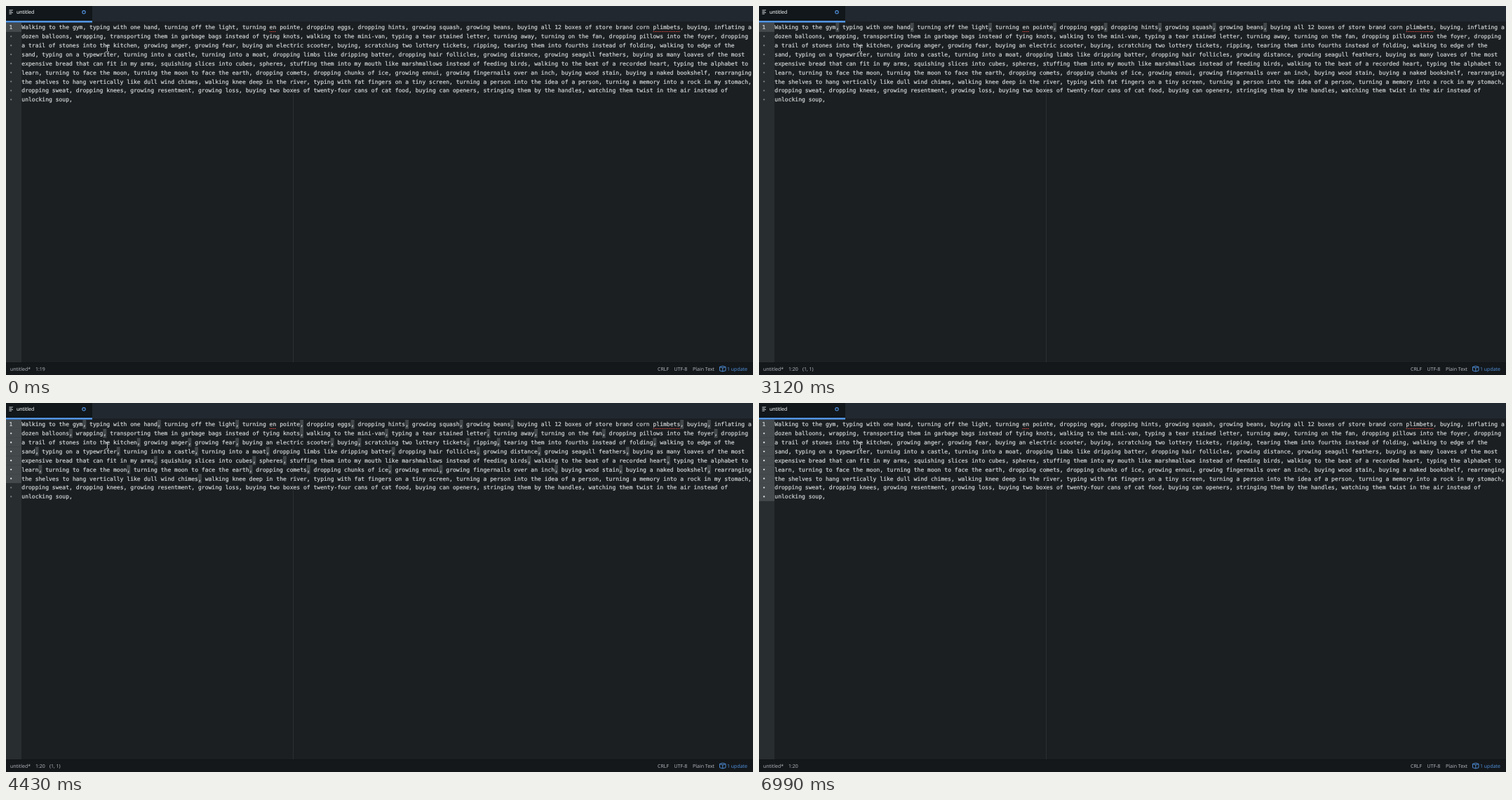
An HTML page that plays this animation: 1065 px wide and 526 px high, repeating every 8 s.

```html
<!DOCTYPE html>
<html lang="en">
<head>
<meta charset="utf-8">
<title>Text editor, many cursors</title>
<style>
  html, body { margin: 0; width: 100%; height: 100%; overflow: hidden; background: #1b1f21; }
  svg { display: block; width: 100%; height: 100%; }
  text { text-rendering: geometricPrecision; }
  .code { font: 8.04px "DejaVu Sans Mono", monospace; fill: #d3d6d7; stroke: #d3d6d7; stroke-width: .2px; }
  .ui { font: 7px "Open Sans", "Noto Sans", sans-serif; fill: #b9bec4; }
  .blue { fill: #5294e2; }
</style>
</head>
<body>
<svg id="stage" viewBox="0 0 1065 526" preserveAspectRatio="none"></svg>
<script>
const LOOP = 8000;
const GUTTER = 22, LEFT = 22.3, TOP = 24, CHAR = 4.84, ROW = 12.87;

const lines = [
  "Walking to the gym, typing with one hand, turning off the light, turning en pointe, dropping eggs, dropping hints, growing squash, growing beans, buying all 12 boxes of store brand corn plimbets, buying, inflating a",
  "dozen balloons, wrapping, transporting them in garbage bags instead of tying knots, walking to the mini-van, typing a tear stained letter, turning away, turning on the fan, dropping pillows into the foyer, dropping",
  "a trail of stones into the kitchen, growing anger, growing fear, buying an electric scooter, buying, scratching two lottery tickets, ripping, tearing them into fourths instead of folding, walking to edge of the",
  "sand, typing on a typewriter, turning into a castle, turning into a moat, dropping limbs like dripping batter, dropping hair follicles, growing distance, growing seagull feathers, buying as many loaves of the most",
  "expensive bread that can fit in my arms, squishing slices into cubes, spheres, stuffing them into my mouth like marshmallows instead of feeding birds, walking to the beat of a recorded heart, typing the alphabet to",
  "learn, turning to face the moon, turning the moon to face the earth, dropping comets, dropping chunks of ice, growing ennui, growing fingernails over an inch, buying wood stain, buying a naked bookshelf, rearranging",
  "the shelves to hang vertically like dull wind chimes, walking knee deep in the river, typing with fat fingers on a tiny screen, turning a person into the idea of a person, turning a memory into a rock in my stomach,",
  "dropping sweat, dropping knees, growing resentment, growing loss, buying two boxes of twenty-four cans of cat food, buying can openers, stringing them by the handles, watching them twist in the air instead of",
  "unlocking soup,"
];

// [time, number of selected commas]
const picks = [
  [1510, 1], [2510, 2], [2970, 3], [3120, 8], [3240, 12], [3390, 16],
  [3510, 20], [3630, 24], [3750, 28], [3880, 32], [4000, 36], [4150, 40],
  [4300, 45], [4430, 49], [4570, 53], [4700, 57], [4860, 61]
];
const RELEASE = 6290;

const SVG = "http://www.w3.org/2000/svg";
const stage = document.getElementById("stage");
const colX = c => LEFT + c * CHAR;
const rowY = r => TOP + r * ROW;

function add(tag, attrs, text, parent = stage) {
  const el = document.createElementNS(SVG, tag);
  for (const k in attrs) el.setAttribute(k, attrs[k]);
  if (text) el.textContent = text;
  return parent.appendChild(el);
}
const rect = (x, y, width, height, fill) => add("rect", { x, y, width, height, fill });
const path = (d, stroke, width = 1) =>
  add("path", { d, stroke, "stroke-width": width, fill: "none" });
const label = (x, y, text, cls = "ui") => add("text", { x, y, class: cls }, text);
const show = (el, on) => el.setAttribute("visibility", on ? "visible" : "hidden");

// Each word starts on its column of the character grid
function codeLine(line, r) {
  const row = add("text", { y: rowY(r) + 9.3, class: "code" });
  for (const m of line.matchAll(/\S+/g)) add("tspan", { x: colX(m.index) }, m[0], row);
}

// Editor background, gutter and wrap guide
rect(0, 0, 1065, 526, "#1b1f21");
rect(0, TOP, GUTTER, 484, "#282d2f");
rect(409, TOP, 1, 484, "#2a2f31");

// Tab bar
rect(0, 0, 1065, 22, "#21282f");
rect(0, 22, 1065, 2, "#1a1f23");
rect(0, 0, 123, 21, "#11171a");
rect(0, 21, 123, 2.6, "#5294e2");
path("M4.5 5.9H10M4.5 7.7H8.5M4.5 9.5H10M4.5 11.3H8", "#c5cad0", .9);
label(15, 11.4, "untitled").setAttribute("style", "fill:#eef0f2;stroke:#eef0f2;stroke-width:.12px");
add("circle", { cx: 111, cy: 8.8, r: 2.2, fill: "none", stroke: "#5294e2", "stroke-width": 1.1 });

// Gutter rows
const gutter = lines.map((_, r) => ({
  bar: rect(0, rowY(r), GUTTER, ROW + .05, "#44494c"),
  mark: r ? add("circle", { cx: 7.2, cy: rowY(r) + 6.5, r: 1.15 })
          : label(4.6, rowY(0) + 9.3, "1", "code")
}));

// One selection box and caret for each comma
const commas = [];
lines.forEach((line, row) => {
  for (const m of line.matchAll(/,/g)) {
    commas.push({
      row,
      box: rect(colX(m.index), rowY(row), CHAR, ROW, "#43484b"),
      caret: rect(Math.round(colX(m.index + 1)), rowY(row), 1, ROW, "#d3d6d7")
    });
  }
});
const firstCaret = rect(110, TOP, 1, 13, "#d3d6d7");

lines.forEach(codeLine);

// Spelling marks
for (const word of ["en ", "plimbets"]) {
  const c = lines[0].indexOf(" " + word) + 1;
  path(`M${colX(c)} 36.5H${colX(c + word.trim().length)}`, "#c9403a")
    .setAttribute("stroke-dasharray", "1.6 .9");
}

// Mouse pointer
path("M142 56.5H143.5L144.5 57.5L145.5 56.5H147M144.5 57.5V64.5M142 65.5H143.5L144.5 64.5L145.5 65.5H147", "#e4e6e7", .8);

// Status bar
rect(0, 508, 1065, 18, "#14181b");
rect(0, 508, 1065, 1, "#101416");
label(6, 520, "untitled*");
const place = label(42, 520, "1:19");
const range = label(62, 520, "(1, 1)");
label(929, 520, "CRLF");
label(952.5, 520, "UTF-8");
label(979, 520, "Plain Text");
path("M1017.5 514.5L1021.8 513.3L1026 514.5V519.8L1021.8 521L1017.5 519.8ZM1017.5 514.5L1021.8 515.8L1026 514.5M1021.8 515.8V521", "#5294e2", .9);
label(1028, 520, "1 update", "ui blue");

const within = (t, a, b) => t >= a && t < b;

function draw(t) {
  const reached = picks.filter(p => p[0] <= t).pop();
  const count = reached ? reached[1] : 0;
  const lastRow = count ? commas[count - 1].row : 0;
  const selecting = count > 0 && t < RELEASE;
  const caretsOn = within(t, 6590, 6990);

  commas.forEach((c, i) => {
    show(c.box, selecting && i < count);
    show(c.caret, caretsOn);
  });
  gutter.forEach((g, r) => {
    show(g.bar, r <= lastRow);
    if (r) g.mark.setAttribute("fill", r <= lastRow ? "#e2e4e5" : "#7b8082");
  });
  show(firstCaret, within(t, 300, 680) || within(t, 1090, 1510));
  place.textContent = count ? "1:20" : "1:19";
  show(range, selecting);
}

const start = performance.now();
function tick() {
  draw((performance.now() - start) % LOOP);
  requestAnimationFrame(tick);
}
tick();
</script>
</body>
</html>
```
